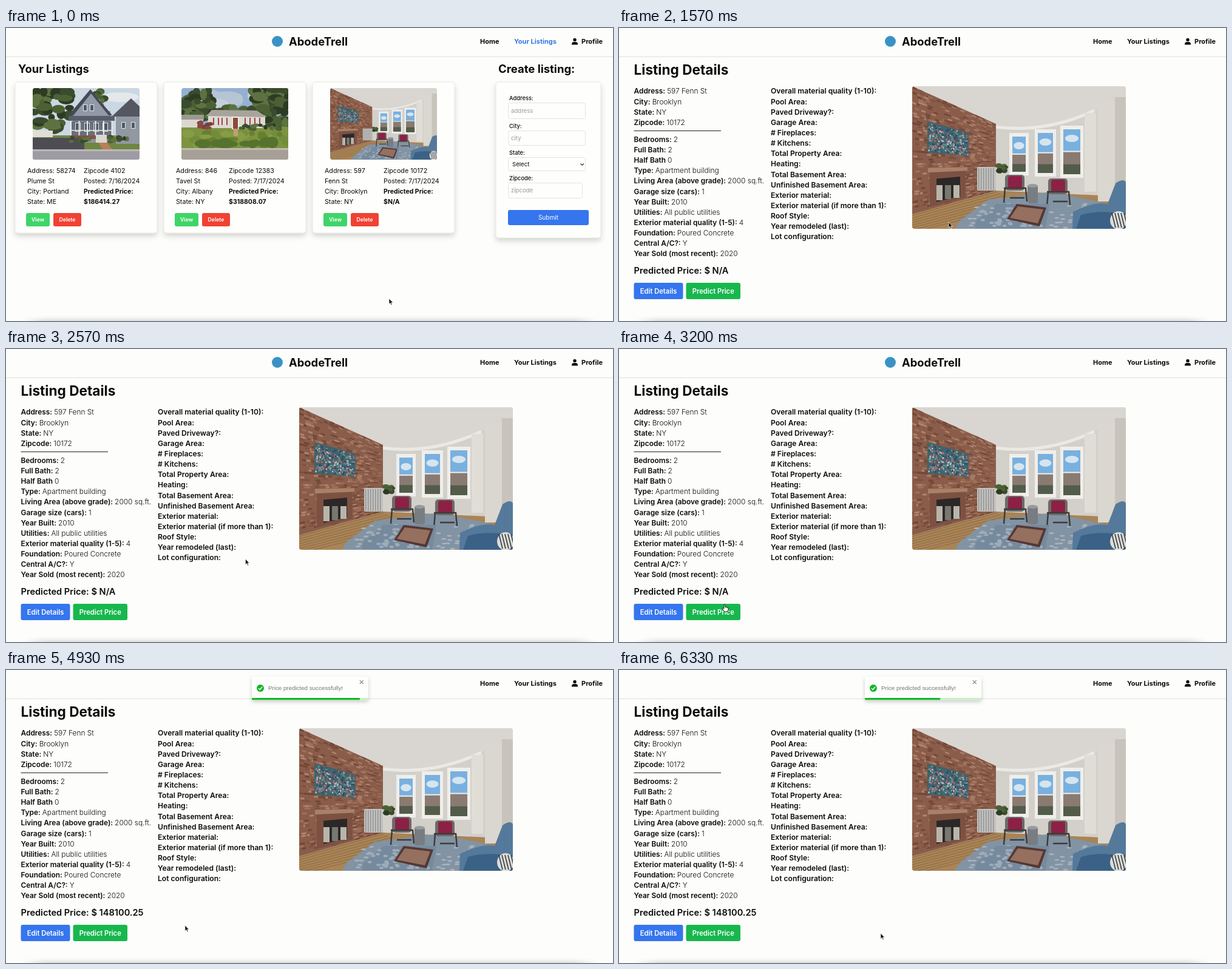
Recreate the animation shown at these times as an HTML page. Size 1000 by 483 pixels, loop 6360 ms.

```html
<!DOCTYPE html>
<html lang="en">
<head>
<meta charset="utf-8">
<title>Listings</title>
<style>
html, body { margin: 0; width: 100%; height: 100%; overflow: hidden; background: #fdfdfb; }
svg { display: block; width: 100vw; height: 100vh; font-family: Inter, Roboto, sans-serif; fill: #0b0b0b; }
.card { fill: #fefefc; stroke: #e8e8e2; filter: drop-shadow(0 5px 4px rgba(0, 0, 0, .15)); }
.field { fill: #fefefc; stroke: #e4e4dd; }
.lift { filter: drop-shadow(0 3px 3px rgba(0, 0, 0, .2)); }
.sans { font-family: "Liberation Sans", Arial, sans-serif; }
</style>
</head>
<body>
<svg id="stage" viewBox="0 0 1000 483"></svg>
<script>
const LOOP = 6360, SWAP = 1500, PRICED = 4130, TOAST = 4370;
const BLUE = '#3575ee', GREEN = '#18b74e', LIME = '#3fd468', RED = '#f04233';

// Markup helpers
const rect = (x, y, w, h, fill, r = 0, more = '') =>
  `<rect x="${x}" y="${y}" width="${w}" height="${h}" rx="${r}" ${fill ? `fill="${fill}"` : ''} ${more}/>`;
const poly = (points, fill) => `<polygon points="${points}" fill="${fill}"/>`;
const path = (d, fill, more = '') => `<path d="${d}" fill="${fill}" ${more}/>`;
const line = (d, color, width) => path(d, 'none', `stroke="${color}" stroke-width="${width}"`);
const oval = (x, y, rx, ry, fill) => `<ellipse cx="${x}" cy="${y}" rx="${rx}" ry="${ry}" fill="${fill}"/>`;
const text = (x, y, s, size, weight = 400, more = '') =>
  `<text x="${x}" y="${y}" font-size="${size}" font-weight="${weight}" ${more}>${s}</text>`;
const button = (x, y, w, h, label, size, fill, weight = 600) =>
  rect(x, y, w, h, fill, 3) + text(x + w / 2, y + h / 2 + size * .36, label, size, weight, 'text-anchor="middle" fill="#fff"');
const repeat = (n, make) => Array.from({ length: n }, (_, i) => make(i)).join('');

let seed = 7;
const rnd = () => (seed = seed * 16807 % 2147483647) / 2147483647;
const foliage = (n, x, y, w, h, size, colors) => repeat(n, i =>
  oval(x + rnd() * w, y + rnd() * h, size * (.6 + rnd()), size * (.5 + rnd() * .6), colors[i % colors.length]));
const pane = (x, y, w, h) => rect(x - 1, y - 1, w + 2, h + 2, '#e6e6e2') + rect(x, y, w, h, '#4a5a6c');
const gable = (x, y, w, h, fill) => poly([x, y + h, x + w / 2, y, x + w, y + h], fill);

// Pictures
const leaves = ['#3b4b2e', '#4b6134', '#2d3b24', '#5d7240'];

function grayHouse() {
  return rect(0, 0, 176, 118, '#cbd7e2') + oval(145, 15, 30, 8, '#e4e8ea') +
    foliage(45, 0, 0, 62, 68, 9, leaves) + foliage(18, 102, 4, 16, 36, 5, leaves) + rect(0, 78, 176, 40, '#6f8542') +
    rect(137, 45, 39, 47, '#9298a2') + gable(130, 17, 64, 30, '#54575f') + repeat(2, i => pane(147 + i * 16, 57, 5, 9)) +
    rect(66, 38, 62, 52, '#8c93a2') + gable(59, 2, 72, 43, '#454a54') + gable(67, 9, 58, 36, '#929aa9') +
    repeat(2, i => pane(84 + i * 11, 28, 5, 9)) + rect(59, 46, 76, 8, '#585e69') + rect(64, 55, 66, 23, '#686f7d') +
    repeat(4, i => pane(71 + i * 15, 58, 7, 13)) + repeat(6, i => rect(62 + i * 13.5, 54, 2, 28, '#eaeae4')) +
    rect(62, 69, 70, 1.5, '#eaeae4') + rect(62, 78, 70, 6, '#8b5145') + rect(104, 77, 18, 13, '#d9d8d0') +
    rect(0, 82, 85, 24, '#4d4d53') + rect(0, 70, 33, 11, '#dfdfd8') +
    foliage(14, 62, 82, 34, 8, 4, leaves) + foliage(12, 126, 80, 30, 8, 4, leaves) +
    poly('108,90 122,90 135,105 118,105', '#b87f5c') + rect(0, 102, 176, 16, '#9d9ca4') + rect(0, 101, 176, 3, '#bbb9b6');
}

function ranchHouse() {
  const shutters = x => rect(x, 49, 10, 12, '#a5433c') + rect(x + 2, 49, 6, 12, '#d8dee0');
  return rect(0, 0, 176, 118, '#94b1d2') + foliage(9, 40, 8, 90, 22, 16, ['#c5d0da', '#b5c5d4']) +
    foliage(50, 0, 4, 48, 44, 9, leaves) + foliage(32, 48, 32, 88, 16, 7, leaves) + foliage(52, 118, 2, 58, 56, 9, leaves) +
    rect(0, 64, 176, 54, '#7d9340') + rect(0, 46, 36, 19, '#dad8ce') + rect(0, 44, 37, 8, '#9c9893') +
    rect(44, 45, 94, 21, '#dcdad0') + poly('50,36 124,37 141,48 41,46', '#a8a39b') +
    repeat(2, i => shutters(52 + i * 14) + shutters(104 + i * 16)) + rect(83, 47, 12, 21, '#efece2') + rect(85, 49, 8, 18, '#8a4b3a') +
    foliage(14, 30, 57, 18, 9, 4, ['#75403c', '#8a4842']) + foliage(22, 98, 61, 66, 6, 4, leaves) +
    foliage(30, 0, 74, 176, 22, 7, ['#738c3b', '#879c46', '#66802f']) + foliage(12, 0, 88, 176, 5, 9, ['#56722f']) +
    rect(86, 67, 7, 12, '#c39e75') + rect(0, 100, 176, 18, '#a69f96') + rect(0, 99, 176, 3, '#c2bbb0');
}

function loft() {
  // Points on the receding brick wall: v runs from ceiling (0) to floor (1)
  const wallY = (x, v) => x * .45 + (211 - x * .73) * v;
  const slab = (x1, x2, v1, v2, fill) =>
    poly([x1, wallY(x1, v1), x2, wallY(x2, v1), x2, wallY(x2, v2), x1, wallY(x1, v2)], fill);
  const speck = (n, x, y, w, h, rx, ry, colors) => repeat(n, i => oval(x + rnd() * w, y + rnd() * h, rx, ry, colors[i % colors.length]));
  const bricks = repeat(520, i => {
    const x = rnd() * 131, v = Math.floor(rnd() * 50) / 50;
    return slab(x, x + 7, v, v + .015, ['#a0715a', '#704636', '#b08370', '#7d5140'][i % 4]);
  });
  const paint = repeat(300, i => {
    const x = 26 + rnd() * 64, v = .25 + rnd() * .24;
    return slab(x, x + 2.5, v, v + .015, ['#b9bfc0', '#5f9a8c', '#35708e', '#b8696f', '#2d4560'][i % 5]);
  });
  const bay = i => {
    const x = 165 + i * 42, y = 83 - i * 6, w = 22 + i * 3, h = 58 + i * 8;
    return rect(x - 5, y - 6, w + 10, h + 12, '#efeeea') + rect(x, y, w, h, '#79b0df') + oval(x + w / 2, y + 15, w * .4, 6, '#d5e5f0') +
      rect(x, y + h * .5, w, h * .5, '#8a7b72') + rect(x, y + h * .78, w, h * .22, '#535c4b') + rect(x, y + h * .48, w, 2, '#f0efeb');
  };
  const chair = (x, y) => rect(x, y, 32, 26, '#6c6b6a', 5) + rect(x + 5, y + 2, 23, 20, '#8c2145', 3) +
    line(`M${x - 2} ${y + 22}h36l2 22M${x} ${y + 22}l-2 24M${x + 8} ${y + 38}h24`, '#3c3a3a', 2.5);
  return rect(0, 0, 352, 235, '#d3d0ca') + poly('0,0 352,0 352,18 250,61 200,72 136,65', '#d9d6d1') +
    line('M136 67Q220 78 300 40', '#ebe9e5', 5) +
    poly('0,211 139,172 352,182 352,235 0,235', '#a98456') +
    repeat(8, i => line(`M0 ${213 + i * 4}L${140 + i * 6} ${174 + i * 3}`, '#85633f', .8)) +
    slab(0, 138, 0, 1, '#8a5d4a') + bricks + slab(25, 93, .24, .51, '#44626a') + paint +
    slab(29, 88, .66, .98, '#7c5142') + slab(40, 79, .74, .95, '#2c2827') + slab(26, 91, .64, .68, '#a98168') +
    repeat(3, i => rect(40 + i * 14, 163, 10, 25 - i * 2, ['#b8b5ab', '#77786f'][i % 2])) +
    repeat(3, bay) + rect(284, 44, 19, 130, '#e0ddd7') + rect(306, 26, 28, 164, '#dad7d0') + rect(334, 18, 18, 152, '#c8c4bc') +
    rect(107, 133, 31, 39, '#c2c2c0', 2) + repeat(7, i => rect(109 + i * 4, 135, 1.4, 36, '#90918f')) +
    foliage(10, 141, 130, 13, 10, 4, leaves) +
    poly('78,222 125,187 230,174 318,193 330,235 70,235', '#8293a3') + speck(60, 95, 194, 220, 40, 4, 1.4, ['#a8b3be']) +
    chair(153, 146) + chair(224, 152) + rect(190, 163, 17, 30, '#777d82', 4) + oval(198.5, 164, 8.5, 3, '#979b9e') +
    poly('104,224 139,194 226,194 219,235 104,235', '#768a9e') + speck(50, 115, 200, 98, 33, 3.5, 2, ['#9eacb9']) +
    poly('156,219 172,194 221,200 210,231', '#553733') + poly('161,217 174,198 216,203 207,226', '#95705f') +
    path('M265 207Q300 189 322 194L335 160Q348 151 352 158V235H264Z', '#55799a') + path('M278 212Q310 203 352 211V235H270Z', '#3b6286') +
    oval(340, 221, 14, 15, '#dcdcd8') + repeat(5, i => line(`M${329 + i * 5} 209l6 24`, '#34383c', 1.6));
}

const picture = (x, y, w, h, art, scale = 1) => `<clipPath id="clip${x}">${rect(x, y, w, h, '#000', 4)}</clipPath>
  <g clip-path="url(#clip${x})"><g transform="translate(${x} ${y}) scale(${scale})">${art}</g></g>`;

// Pages
function card(x, col, left, right, art, scale) {
  const rows = (cx, list, strong) => list.map((s, i) => text(cx, 239 + i * 17.1, s, strong && i > 1 ? 10.5 : 10.7, strong && i > 1 ? 700 : 400)).join('');
  return rect(x, 89, 234, 249, '', 5, 'class="card"') + picture(x + 29, 99, 176, 118, art, scale) +
    rows(x + 20, left) + rows(col, right, true) +
    button(x + 18, 305, 39, 22, 'View', 8.7, LIME) + button(x + 63, 305, 46, 22, 'Delete', 8.7, RED);
}

function field(label, hint, y, w, h, ink) {
  return text(829, y - 4.2, label, 9.3, 500) + rect(827.5, y, w, h, '', 3, 'class="field"') +
    text(ink ? 834 : 832, y + h / 2 + 3.4, hint, 9.6, 400, `fill="${ink || '#9a9a98'}"`);
}

const form = rect(807, 89, 173, 257, '', 5, 'class="card"') +
  field('Address:', 'address', 123.5, 127, 26) + field('City:', 'city', 169.5, 127, 24) +
  field('State:', 'Select', 213.5, 127, 22, '#0b0b0b') + line('M946.5 223.5l2.7 2.7 2.7-2.7', '#333', 1.2) +
  field('Zipcode:', 'zipcode', 255.5, 122, 25) + button(827, 300, 133, 25, 'Submit', 10.1, BLUE, 400);

const facts = ['Address:|597 Fenn St', 'City:|Brooklyn', 'State:|NY', 'Zipcode:|10172', 'Bedrooms:|2', 'Full Bath:|2', 'Half Bath|0',
  'Type:|Apartment building', 'Living Area (above grade):|2000 sq.ft.', 'Garage size (cars):|1', 'Year Built:|2010', 'Utilities:|All public utilities',
  'Exterior material quality (1-5):|4', 'Foundation:|Poured Concrete', 'Central A/C?:|Y', 'Year Sold (most recent):|2020'];
const blanks = ['Overall material quality (1-10):', 'Pool Area:', 'Paved Driveway?:', 'Garage Area:', '# Fireplaces:', '# Kitchens:', 'Total Property Area:',
  'Heating:', 'Total Basement Area:', 'Unfinished Basement Area:', 'Exterior material:', 'Exterior material (if more than 1):', 'Roof Style:',
  'Year remodeled (last):', 'Lot configuration:'];

const rowY = i => 108.4 + i * 17.14;
const factRow = (s, i) => {
  const [key, value] = s.split('|');
  return text(24.5, rowY(i) + (i > 3 ? 10.9 : 0), `${key} <tspan font-weight="300">${value}</tspan>`, 11.9, 600);
};

const room = loft();
const header = rect(0, 46.8, 1000, 1, '#dfdfd8') +
  `<circle cx="447" cy="22" r="9" fill="#3a92c4"/>` + text(466, 28.8, 'AbodeTrell', 18.4, 700) +
  text(781, 26.4, 'Home', 11, 700) + text(837, 26.4, 'Your Listings', 11, 700, 'id="navList"') + text(948, 26.4, 'Profile', 11, 700) +
  `<circle cx="937" cy="19.4" r="2.7"/>` + path('M932 27.5v-1q0-3.6 3.6-3.6h2.8q3.6 0 3.6 3.6v1z', '#0b0b0b');

const listPage = text(20, 74, 'Your Listings', 18.4, 700) + text(811, 74, 'Create listing:', 18.5, 700) +
  card(15, 128, ['Address: 58274', 'Plume St', 'City: Portland', 'State: ME'], ['Zipcode 4102', 'Posted: 7/16/2024', 'Predicted Price:', '$186414.27'], grayHouse()) +
  card(260, 367, ['Address: 846', 'Tavel St', 'City: Albany', 'State: NY'], ['Zipcode 12383', 'Posted: 7/17/2024', 'Predicted Price:', '$318808.07'], ranchHouse()) +
  card(505, 622, ['Address: 597', 'Fenn St', 'City: Brooklyn', 'State: NY'], ['Zipcode 10172', 'Posted: 7/17/2024', 'Predicted Price:', '$N/A'], room, .502) +
  `<g id="viewHover">${button(523, 305, 39, 22, 'View', 8.7, GREEN)}</g>` + form;

const predict = fill => button(110.5, 420, 89.5, 27, 'Predict Price', 11.2, fill);
const detailPage = text(24.5, 77, 'Listing Details', 22.6, 700) + facts.map(factRow).join('') + rect(24.5, 169, 143.5, 1, '#222') +
  blanks.map((s, i) => text(250, rowY(i), s, 12.1, 600)).join('') + picture(483, 96, 352, 235, room) +
  text(24.5, 405.3, '', 14.6, 600, 'id="price"') + button(24.5, 420, 81, 27, 'Edit Details', 11.2, BLUE) + predict(GREEN) +
  `<g id="predictHover" class="lift">${predict('#128f3c')}</g>`;

const toast = rect(405, 11, 192, 38.5, '#fefefc', 3, 'class="lift"') +
  rect(405, 46, 192, 3.2, '#c9efc6', 1) + rect(405, 46, 192, 3.2, '#14b82a', 1, 'id="bar"') +
  `<circle cx="419" cy="30" r="6" fill="#14b52a"/>` + line('M416 30.2l2.2 2.3 4-4.7', '#fff', 1.5) +
  text(432, 33.2, 'Price predicted successfully!', 9.75, 400, 'class="sans" fill="#757575"') + line('M582.8 17l6 6m0-6l-6 6', '#8b8b8b', 1.1);

document.getElementById('stage').innerHTML =
  `<filter id="soft" x="-10%" y="-300%" width="120%" height="700%"><feGaussianBlur stdDeviation="14 5"/></filter>` +
  rect(0, 0, 1000, 483, '#fdfdfb') + rect(45, 482, 910, 14, '#000', 0, 'filter="url(#soft)" opacity=".22"') + header +
  `<g id="list">${listPage}</g><g id="detail">${detailPage}</g><g id="toast">${toast}</g>
  <g id="arrow">${path('M0 0V9.3L2.2 7.3 3.7 10.8 5.2 10.2 3.7 6.8H6.6Z', '#111', 'stroke="#fff" stroke-width=".7"')}</g>
  <g id="hand">${path('M-1 7V1Q0-1 1 1V4.4L6 5.5V8.6L4.8 12H0L-3.6 7.6-2.8 6.2Z', '#fff', 'stroke="#111" stroke-width=".9" stroke-linejoin="round"')}</g>`;

// Pointer moves: start, end, x, y
const home = { x: 631, y: 446 };
const moves = [[500, 1130, 544, 323], [1200, 1400, 543, 320], [2300, 3180, 174, 421], [3300, 3630, 157, 430], [4400, 5750, 431, 434]];

const ramp = (t, from, to) => Math.min(1, Math.max(0, (t - from) / (to - from)));
const easeOut = p => 1 - (1 - p) ** 1.4;

// Each move bends slightly upwards in the middle
function pointer(t) {
  return moves.reduce((at, [from, to, x, y]) => {
    const p = easeOut(ramp(t, from, to)), dx = x - at.x, dy = y - at.y;
    return { x: at.x + dx * p, y: at.y + dy * p - .04 * Math.hypot(dx, dy) * Math.sin(Math.PI * p) };
  }, home);
}

function drop(t) {
  const u = ramp(t, TOAST, TOAST + 520);
  return -62 * (1 - u) ** 3 * Math.cos(7 * u);
}

const $ = id => document.getElementById(id);
const show = (id, on) => $(id).style.display = on ? '' : 'none';
const place = (id, x, y) => $(id).setAttribute('transform', `translate(${x} ${y})`);

function draw(t) {
  const detail = t >= SWAP;
  show('list', !detail);
  show('detail', detail);
  $('navList').setAttribute('fill', detail ? '#0b0b0b' : '#3578e8');
  $('viewHover').setAttribute('opacity', ramp(t, 1050, 1190));
  $('predictHover').setAttribute('opacity', ramp(t, 3210, 3400) - ramp(t, 4560, 4710));
  $('price').textContent = 'Predicted Price: $ ' + (t < PRICED ? 'N/A' : '148100.25');

  show('toast', t >= TOAST);
  place('toast', 0, drop(t));
  $('bar').setAttribute('width', 192 * (1 - ramp(t, 4567, 9567)));

  const { x, y } = pointer(t);
  const over = detail ? x > 110 && x < 200 && y > 419 : x > 523 && x < 562 && y > 305 && y < 327;
  show('hand', over);
  show('arrow', !over);
  place(over ? 'hand' : 'arrow', x, y);
}

const start = performance.now();
function tick() {
  draw((performance.now() - start) % LOOP);
  requestAnimationFrame(tick);
}
tick();
</script>
</body>
</html>
```
